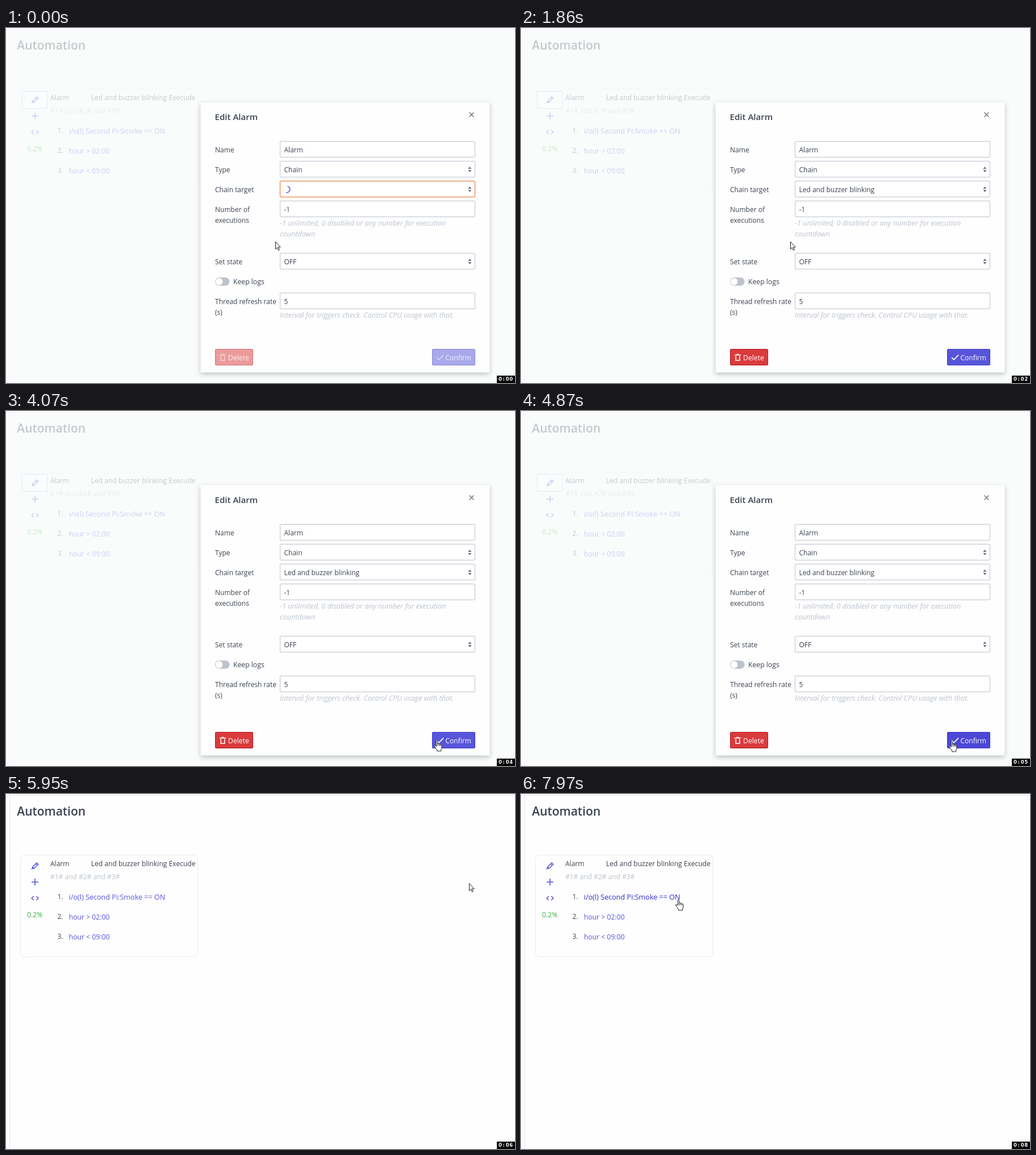
Recreate the animation shown at these times as an HTML page with a canvas. Size 896 px wide and 625 px high, loop 8000 ms.

```html
<!DOCTYPE html>
<html lang="en">
<head>
<meta charset="utf-8">
<title>Automation</title>
<style>
  html, body { margin: 0; width: 100%; height: 100%; overflow: hidden; background: #fefefe; }
  canvas { display: block; }
</style>
</head>
<body>
<canvas id="stage" width="896" height="625"></canvas>
<script>
const ctx = document.getElementById('stage').getContext('2d');
const LOOP = 8000;
const INK = '#3b4351', BLUE = '#5755d9', DEEP_BLUE = '#3f3cd2', GRAY = '#bcc3ce';

// Each pointer stop: start time, shape, position of its hot spot.
const pointerStops = [
  [0, 'arrow', 474, 376],
  [3170, 'arrow', 448, 462],
  [3440, 'arrow', 486, 535],
  [3690, 'arrow', 637, 569],
  [3970, 'hand', 758.5, 580],
  [4340, 'hand', 758.5, 581],
  [5150, 'arrow', 465, 554],
  [5430, 'arrow', 701, 219],
  [5700, 'hand', 815.5, 158],
  [5950, 'arrow', 815, 157],
  [7100, 'arrow', 717, 172],
  [7370, 'arrow', 412, 198],
  [7620, 'arrow', 287, 188],
  [7870, 'hand', 277, 186]
];
const clockTicks = [800, 1860, 2890, 4070, 4870, 5950, 7000, 7970];

const arrowShape = new Path2D('M.5 .5V13.2L3.4 10.5L5.3 15.2L7.3 14.4L5.4 9.8H9.2Z');
const handShape = new Path2D(
  'M4.2 1.8Q4.2 .5 5.4 .5Q6.7 .5 6.7 1.8V6.2Q7 5.4 8 5.5Q9.2 5.6 9.3 6.8Q9.7 6 10.6 6.2' +
  'Q11.7 6.4 11.7 7.5Q12.3 7 13 7.3Q13.9 7.7 13.9 8.8V12Q13.9 14.5 12.6 16V18.8H5.7V17' +
  'Q4 15 2.6 12.6L.8 10Q.3 8.8 1.3 8.4Q2.3 8.1 3.2 9.4L4.2 10.7Z');
const handCreases = new Path2D('M6.7 6.2V9.8M9.3 6.8V9.8M11.7 7.5V10');

function text(str, x, y, color = INK, size = 12, style = '') {
  ctx.font = `${style} ${size}px "Open Sans", "Noto Sans", sans-serif`;
  ctx.fillStyle = color;
  ctx.fillText(str, x, y);
}

function box(x, y, w, h, r, fill, border) {
  ctx.beginPath();
  ctx.roundRect(x, y, w, h, r);
  if (fill) { ctx.fillStyle = fill; ctx.fill(); }
  if (border) { ctx.strokeStyle = border; ctx.lineWidth = 1; ctx.stroke(); }
}

function line(path, color, width) {
  ctx.strokeStyle = color;
  ctx.lineWidth = width;
  ctx.stroke(new Path2D(path));
}

function drawPage(editFocused, linkHover) {
  ctx.fillStyle = '#fcfdfd';
  ctx.fillRect(0, 0, 896, 625);
  ctx.fillStyle = '#fefefe';
  ctx.fillRect(6, 2, 890, 623);
  line('M896 2.5H6.5V625', '#e3e7e9', 1);
  text('Automation', 19.3, 38, INK, 21, '600');

  box(25.5, 107.5, 312, 179, 7, null, '#e9ebef');
  if (editFocused) box(28.5, 111.5, 44, 30, 1.5, '#fff', 'rgba(87,85,217,.45)');
  line('M46.2 131.3L47.1 128L54.1 121L56.8 123.7L49.8 130.7ZM52.2 123L54.8 125.6', BLUE, 1.4);
  line('M45.5 131.8L47.2 128.2L49.6 130.4Z', BLUE, 1.2);
  line('M51 149V161M45 155H57', BLUE, 1.6);
  line('M48.7 180L45.2 183.5L48.7 187M53.3 180L56.8 183.5L53.3 187', BLUE, 1.6);
  text('0.2%', 37, 217, '#32b643', 12.2);

  text('Alarm', 78, 126.5);
  text('Led and buzzer blinking Execude', 149.7, 126.5, INK, 12.1);
  text('#1# and #2# and #3#', 78, 149.5, GRAY);
  text('i/o(l) Second Pi:Smoke == ON', 110.7, 186, linkHover ? '#302ecd' : BLUE, 12.6);
  text('hour > 02:00', 110.7, 221, BLUE, 12.2);
  text('hour < 09:00', 110.7, 256, BLUE, 12.2);
  for (let i = 0; i < 3; i++) text(`${i + 1}.`, 90.5, 185 + 35 * i);
}

function field(center, value, border = GRAY) {
  box(482.5, center - 14.5, 343, 28, 1.5, '#fff', border);
  text(value, 489.5, center + 4.6);
}

function select(center, value, border) {
  field(center, value, border);
  ctx.fillStyle = '#667189';
  ctx.fill(new Path2D(`M813.4 ${center - 1}h6l-3 -4zM813.4 ${center + 1}h6l-3 4z`));
}

function drawModal(loading, confirmHover, closeHover) {
  ctx.fillStyle = 'rgba(250,252,252,.72)';
  ctx.fillRect(0, 0, 896, 625);

  ctx.save();
  ctx.shadowColor = 'rgba(48,55,66,.3)';
  ctx.shadowBlur = 8;
  ctx.shadowOffsetY = 3;
  box(342.5, 130.5, 509, 476, 1.6, '#fefefe');
  ctx.restore();

  text('Edit Alarm', 367.5, 162, INK, 15.1, '600');
  line('M815.5 148.5L823.5 156.5M823.5 148.5L815.5 156.5', closeHover ? INK : '#656b76', 1.2);

  const labels = [
    ['Name', 214], ['Type', 249], ['Chain target', 284], ['Number of', 319],
    ['executions', 338], ['Set state', 411], ['Thread refresh rate', 481], ['(s)', 500.5]
  ];
  for (const [label, y] of labels) text(label, 368, y + 4.6);

  field(214, 'Alarm');
  select(249, 'Chain');
  select(284, loading ? '' : 'Led and buzzer blinking', loading ? '#ea6a22' : GRAY);
  field(319, '-1');
  select(411, 'OFF');
  field(481, '5');

  const hint = (str, y) => text(str, 482, y, GRAY, 12.65, 'italic');
  hint('-1 unlimited, 0 disabled or any number for execution', 347.5);
  hint('countdown', 366.5);
  hint('Interval for triggers check. Control CPU usage with that.', 510);

  if (loading) {
    ctx.beginPath();
    ctx.arc(494, 284, 5.8, -1.3, 1.75);
    ctx.strokeStyle = BLUE;
    ctx.lineWidth = 1.6;
    ctx.stroke();
  }

  box(368, 439.3, 25.6, 14.4, 7.2, GRAY);
  box(369, 440.3, 12.4, 12.4, 6.2, '#fff');
  text('Keep logs', 400, 451, INK, 12.2);

  ctx.globalAlpha = loading ? .5 : 1;
  box(368.5, 565.5, 66, 28, 1.5, '#da3b3d', '#b5191d');
  line('M375.8 575.7H387.2M379.5 574.6H383.5M378.2 577.5V585.3H384.8V577.5', '#fff', 1.6);
  box(750.5, 565.5, 75, 28, 1.5, confirmHover ? '#4b48d6' : BLUE, DEEP_BLUE);
  line('M758.2 580.2L762 584L770 575.6', '#fff', 1.8);
  ctx.globalAlpha = loading ? .85 : 1;
  text('Delete', 391, 584.6, '#fff', 12.2);
  text('Confirm', 773.5, 584.6, '#fff');
  ctx.globalAlpha = 1;
}

function drawPointer(t) {
  const [, kind, x, y] = pointerStops.findLast(stop => stop[0] <= t);
  const hand = kind === 'hand';
  const shape = hand ? handShape : arrowShape;
  ctx.save();
  ctx.translate(hand ? x - 5.4 : x, y);
  ctx.fillStyle = '#fff';
  ctx.fill(shape);
  ctx.strokeStyle = '#1d1f24';
  ctx.lineWidth = 1;
  ctx.stroke(shape);
  if (hand) ctx.stroke(handCreases);
  ctx.restore();
}

function drawClock(t) {
  const seconds = clockTicks.filter(tick => tick <= t).length;
  ctx.fillStyle = '#000';
  ctx.fillRect(864, 612, 32, 13);
  ctx.font = 'bold 8.5px "DejaVu Sans", sans-serif';
  ctx.fillStyle = '#fff';
  ctx.textAlign = 'center';
  [...`0:0${seconds}`].forEach((char, i) => ctx.fillText(char, 869.9 + 6.4 * i, 621));
  ctx.textAlign = 'left';
}

function draw(t) {
  const modalOpen = t < 5950;
  drawPage(modalOpen, t >= 7870);
  if (modalOpen) drawModal(t < 250, t >= 4340 && t < 5150, t >= 5700);
  drawPointer(t);
  drawClock(t);
}

const start = performance.now();
function frame() {
  draw((performance.now() - start) % LOOP);
  requestAnimationFrame(frame);
}
frame();
</script>
</body>
</html>
```
